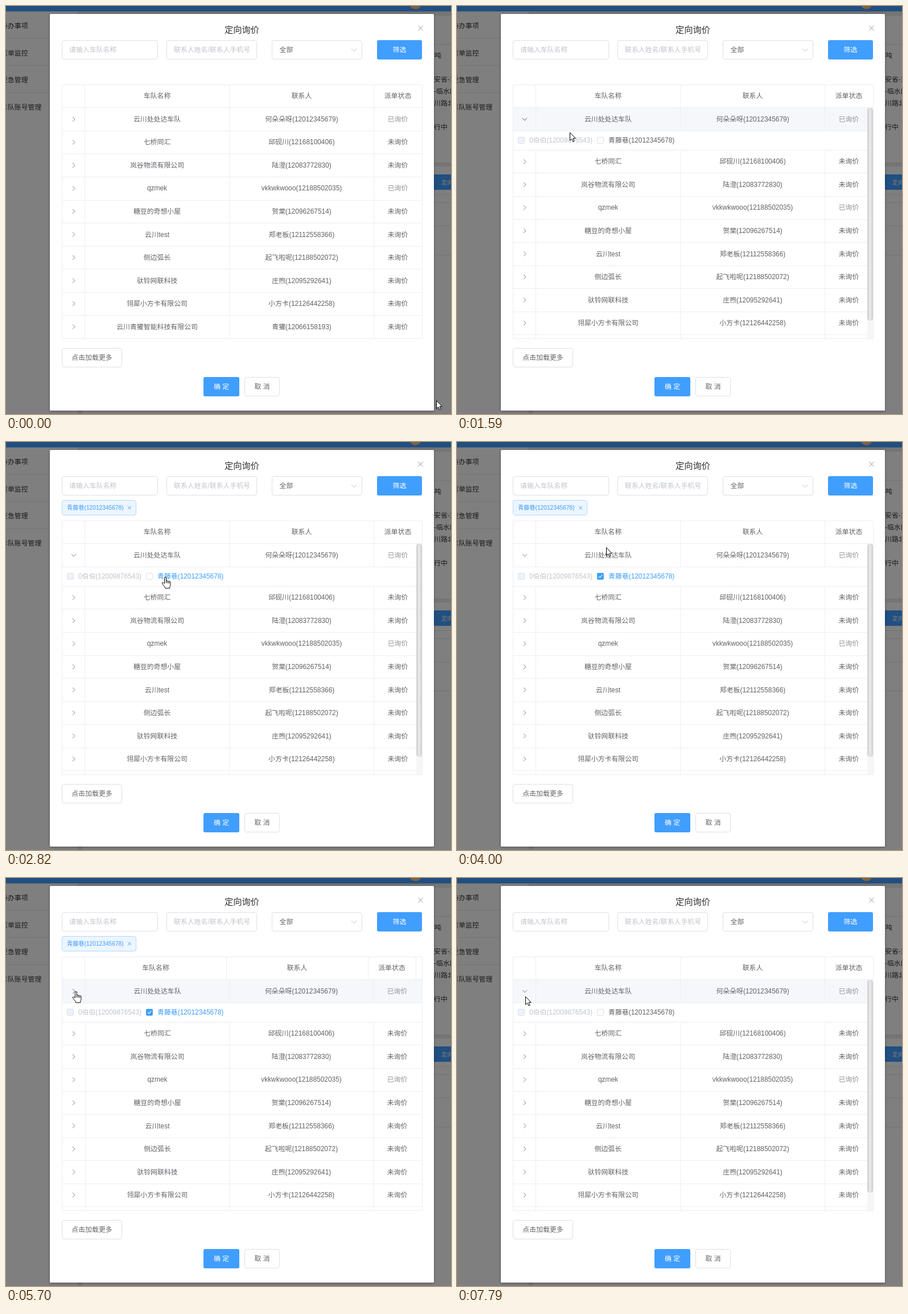
Animation, 782 px wide and 717 px high, one loop 8 s. Source, as an HTML page:

```html
<!DOCTYPE html>
<html lang="zh">
<head>
<meta charset="utf-8">
<title>定向询价</title>
<style>
html, body { margin: 0; width: 100%; height: 100%; overflow: hidden; background: #7f7f7f; }
svg { display: block; width: 782px; height: 717px; }
text {
  font: 11.9px "Liberation Sans", "Noto Sans CJK SC", "Noto Sans CJK", sans-serif;
  fill: #606266; white-space: pre;
}
</style>
</head>
<body>
<svg id="stage" viewBox="0 0 782 717"></svg>
<script>
const LOOP = 8000;
const BLUE = '#409eff', LINE = '#ebeef5', EDGE = '#dcdfe6', PALE = '#c0c4cc', GREY = '#606266', SOFT = '#909399';
const ROW = 40.53, TOP = 138.4;
const lineY = i => Math.floor(TOP + ROW * i);
const midY = i => TOP + ROW * (i + .5) - .6;

const FLEETS = [
  ['云川处处达车队', '何朵朵呀(12012345679)', 1],
  ['七桥同汇', '邱砚川(12168100406)'],
  ['岚谷物流有限公司', '陆澄(12083772830)'],
  ['qzmek', 'vkkwkwooo(12188502035)', 1],
  ['糖豆的奇想小屋', '贺棠(12096267514)'],
  ['云川test', '郑老板(12112558366)'],
  ['侧边弧长', '起飞啦呢(12188502072)'],
  ['驮铃网联科技', '庄煦(12095292641)'],
  ['翎犀小方卡有限公司', '小方卡(12126442258)'],
  ['云川青獾智能科技有限公司', '青獾(12066158193)']
];
const PICKED = '青藤巷(12012345678)';

// Column edges and text centres: settled, and while the scrollbar is being laid out.
const COLS = { edges: [138, 392, 646], mids: [265.5, 519.5, 688.5] };
const COLS_HEAD = { edges: [138, 387, 636, 720], mids: [263, 511.5, 678] };
const COLS_BODY = { edges: [139, 392, 645], mids: [266, 519, 687.5] };

// Pointer moves: first step, last step, number of steps, x, y, hand.
const MOVES = [
  [70, 210, 3, 655, 414, 0],
  [360, 1130, 11, 122, 192, 0],
  [1210, 1210, 1, 127, 195, 1],
  [1280, 1280, 1, 123, 195, 1],
  [1440, 1590, 3, 198, 222, 0],
  [1670, 2210, 8, 268, 245, 0],
  [2360, 2360, 1, 276, 240, 1],
  [2440, 2440, 1, 278, 237, 1],
  [2900, 3220, 5, 278, 232, 1],
  [3450, 3600, 3, 302, 216, 0],
  [3680, 3760, 2, 274, 232, 1],
  [3910, 4000, 2, 262, 185, 0],
  [4080, 4240, 3, 262, 221, 0],
  [4380, 4840, 7, 140, 203, 0],
  [4920, 4920, 1, 121, 199, 1],
  [5780, 6240, 7, 213, 120, 0],
  [6320, 6320, 1, 217, 117, 1],
  [6640, 6640, 1, 217, 117, 0],
  [6720, 7410, 10, 247, 223, 0],
  [7490, 7710, 4, 119, 192, 0],
  [7790, 7790, 1, 120, 208, 0]
];
const PRESSES = [[1280, 1440], [2670, 2820], [4920, 5070], [5530, 5700], [6490, 6640]];
const OPEN = [[1440, 5070], [5700, LOOP]];
const RELAYOUT = [[1440, 1515], [5700, 5790]];
const HOVER = [[1440, 1600], [5070, 5860], [7020, LOOP]];
const CHOSEN = [2820, 6640];

const rect = (x, y, w, h, fill, more = '') =>
  `<rect x="${x}" y="${y}" width="${w}" height="${h}" fill="${fill}" ${more}/>`;
const box = (x, y, w, h, fill, edge, r = 3.4) =>
  rect(x + .5, y + .5, w - 1, h - 1, fill, `stroke="${edge}" rx="${r}"`);
const text = (x, y, s, color = GREY, more = '') =>
  `<text x="${x}" y="${y}" dy=".36em" style="fill:${color};${more}">${s}</text>`;
const label = (x, y, s, color, more = '') => text(x, y, s, color, 'text-anchor:middle;' + more);
const stroke = (d, color, w = 1, more = '') =>
  `<path d="${d}" fill="none" stroke="${color}" stroke-width="${w}" ${more}/>`;
const cross = (x, y, r, color) =>
  stroke(`M${x - r} ${y - r}l${2 * r} ${2 * r}m0 ${-2 * r}l${-2 * r} ${2 * r}`, color);
const chevron = (x, y, id = '') =>
  `<g transform="translate(${x} ${y})">${stroke('M-2 -4L2 0L-2 4', '#808186', 1, id)}</g>`;

function page() {
  const dark = '#1b1b1c', gap = '#757575', rule = '#737375';
  const menu = ['待办事项', '货单监控', '应急管理', '车队账号管理'];
  const notes = [[753, 87, '吨'], [752, 129, '安省-东'], [752, 150, '-临水区'], [752, 171, '川路北'], [752, 213, '行中']];
  return rect(0, 0, 782, 717, '#7f7f7f') +
    rect(126, 9, 8, 708, gap) + rect(126, 9, 656, 8, gap) + rect(0, 0, 782, 9.5, '#204f80') +
    '<circle cx="719.5" cy="-5" r="10.5" fill="#80623f"/>' +
    menu.map((s, i) => text(-9, 35 + 47.5 * i, s, dark)).join('') +
    [56, 104, 152].map(y => rect(0, y, 126, 1, rule)).join('') +
    notes.map(n => text(...n, dark)).join('') +
    [67, 331, 345, 386, 437].map(y => rect(752, y, 30, 1, rule)).join('') +
    rect(752, 275, 30, 7, gap) +
    rect(740, 296, 42, 27, '#204f80') + text(765, 310, '定向', '#808080', 'font-size:10.2px');
}

function dialog() {
  const strong = 'font-weight:500';
  return rect(77, 14, 675, 697, '#fff', 'rx="1.5" style="filter:drop-shadow(0 1px 2px rgba(0,0,0,.35))"') +
    label(414.5, 41, '定向询价', '#303133', 'font-size:15.3px') + cross(728.5, 39, 4.3, SOFT) +
    box(98, 60, 169, 34, '#fff', EDGE) + text(111, 77, '请输入车队名称', PALE) +
    box(282, 60, 159, 34, '#fff', EDGE) +
    `<g clip-path="url(#field)">${text(295, 77, '联系人姓名/联系人手机号', PALE)}</g>` +
    box(467, 60, 159, 34, '#fff', EDGE) + text(480.5, 77, '全部') +
    stroke('M607 75l4.5 4.5l4.5 -4.5', PALE) +
    rect(652, 60, 79, 34, BLUE, 'rx="3"') + label(691.5, 77, '筛选', '#fff', strong) +
    box(98, 601, 106, 34, '#fff', EDGE) + label(151, 618, '点击加载更多') +
    rect(347, 652, 63, 34, BLUE, 'rx="3"') + label(378.5, 669, '确 定', '#fff', strong) +
    box(419, 652, 62, 34, '#fff', EDGE) + label(450, 669, '取 消');
}

const uprights = (cols, i) =>
  cols.edges.map(x => rect(x, lineY(i), 1, lineY(i + 1) - lineY(i), LINE)).join('');

function head(cols) {
  return uprights(cols, 0) + ['车队名称', '联系人', '派单状态'].map((s, k) => label(cols.mids[k], midY(0), s)).join('');
}

function row(cols, n) {
  const [name, contact, asked] = FLEETS[n], i = n + 1, y = midY(i);
  return uprights(cols, i) + rect(98, lineY(i + 1), 634, 1, LINE) +
    label(cols.mids[0], y, name) + label(cols.mids[1], y, contact) +
    label(cols.mids[2], y, asked ? '已询价' : '未询价', asked ? SOFT : GREY) +
    (n ? chevron(119, y + .3) : '');
}

const stage = document.getElementById('stage');
stage.innerHTML = `<defs>
  <clipPath id="field"><rect x="295" y="60" width="133" height="34"/></clipPath>
  <clipPath id="view"><rect x="98" y="178" width="634" height="406"/></clipPath>
  <linearGradient id="bar"><stop offset="0" stop-color="#cbcbcb"/><stop offset=".35" stop-color="#e6e6e6"/>
    <stop offset=".65" stop-color="#e6e6e6"/><stop offset="1" stop-color="#cbcbcb"/></linearGradient>
</defs>` + page() + dialog() +
  `<g id="tag">${box(98, 102, 131, 27, '#ecf5ff', '#b3d8ff')}
    ${text(107, 115.5, PICKED, BLUE, 'font-size:10.2px')}${cross(217, 115.5, 2.8, BLUE)}</g>
  <g id="head"></g>
  <g clip-path="url(#view)">
    ${rect(99, 179, 632, 40, '#f5f7fa', 'id="hover"')}
    <g id="first"></g>${chevron(119, 199, 'id="fold"')}
    <g id="rest"></g>
    <g id="panel">${rect(98, 253, 634, 1, LINE)}
      ${box(107, 230, 12, 12, '#edf2fc', EDGE, 1.7)}${text(127, 236, '0伯伯(12009876543)', PALE)}
      ${box(246, 230, 12, 12, '#fff', EDGE, 1.7)}
      <g id="fill">${box(246, 230, 12, 12, BLUE, BLUE, 1.7)}</g>
      ${stroke('M249 236l2.2 2.3l4 -4.6', '#fff', 1.1, 'id="tick"')}
      <g id="choice">${text(266, 236, PICKED)}</g></g>
    <g id="scroll">${rect(721, 179, 10, 405, '#f6f6f6')}
      ${rect(721.5, 179.5, 9, 373, 'url(#bar)', 'rx="4" stroke="#cfcfcf" stroke-width=".8"')}</g>
  </g>` +
  [138, 178, 584].map(y => rect(98, y, 634, 1, LINE)).join('') +
  [98, 731].map(x => rect(x, 138, 1, 447, LINE)).join('') +
  `<g id="pointer">
    <g id="ring" fill="none"><circle cx=".5" cy=".5" r="9.8" stroke="#000"/><circle cx=".5" cy=".5" r="8.8" stroke="#fff"/></g>
    <g fill="#fff" stroke="#000" stroke-linejoin="round">
      <path id="arrow" d="M.5 .5V14.5L3.7 11.6L6 16.5L8.2 15.5L6 10.7H10.3Z"/>
      <path id="hand" d="M.5 11.5V2a1.5 1.5 0 0 1 3 0V7.5a1.4 1.4 0 0 1 2.6 0V8.3a1.3 1.3 0 0 1 2.5 0V9.2a1.2 1.2 0 0 1 2.4 0V14c0 2 -1.4 3.2 -1.4 6H1.8c0 -2.5 -3 -4.8 -5.3 -8.1c-.8 -1.6 .8 -2.6 2 -1.6ZM3.5 7.5V11M6.1 8.3V11.3M8.6 9.2V11.6"/>
    </g></g>`;

const el = {};
stage.querySelectorAll('[id]').forEach(e => el[e.id] = e);

const clamp = v => Math.max(0, Math.min(1, v));
const ease = v => { v = clamp(v); return v * v * (3 - 2 * v); };
const within = (spans, t) => spans.some(([a, b]) => t >= a && t < b);
const fade = (spans, t, ms) => spans.reduce((v, [a, b]) =>
  Math.max(v, t >= a && t < b ? 1 : t >= b ? 1 - ease((t - b) / ms) : 0), 0);
const show = (e, on) => e.style.display = on ? '' : 'none';

function pointerAt(t) {
  let x = 756, y = 693, hand = 0;
  for (const [from, to, n, tx, ty, h] of MOVES) {
    if (t < from) break;
    const gap = n > 1 ? (to - from) / (n - 1) : 1;
    const k = Math.min(n, Math.floor((t - from) / gap + .1) + 1);
    x += (tx - x) * k / n;
    y += (ty - y) * k / n;
    hand = h;
  }
  return { x: Math.round(x), y: Math.round(y), hand };
}

function foldAngle(t) {
  if (t < 5070) return 90 * ease((t - 1440) / 180);
  if (t < 5700) return 90 - 90 * ease((t - 5070) / 180);
  return 90 * ease((t - 5700) / 180);
}

let laidOut = null;
function layout(moving) {
  if (laidOut === moving) return;
  laidOut = moving;
  const body = moving ? COLS_BODY : COLS;
  el.head.innerHTML = head(moving ? COLS_HEAD : COLS);
  el.first.innerHTML = row(body, 0);
  el.rest.innerHTML = FLEETS.map((f, n) => n ? row(body, n) : '').join('');
}

function draw(t) {
  const open = within(OPEN, t), moving = within(RELAYOUT, t), chosen = within([CHOSEN], t);
  layout(moving);
  show(el.panel, open);
  show(el.scroll, open && !moving);
  show(el.tag, chosen);
  el.rest.setAttribute('transform', `translate(0 ${open ? 34 : 0})`);
  el.fold.setAttribute('transform', `rotate(${foldAngle(t)})`);
  el.hover.style.opacity = fade(HOVER, t, 230);
  const [on, off] = CHOSEN;
  el.fill.style.opacity = ease((t - on) / 250) - ease((t - off) / 250);
  el.tick.style.opacity = ease((t - on - 50) / 150) - ease((t - off) / 150);
  el.choice.firstChild.style.fill = chosen ? BLUE : GREY;

  const p = pointerAt(t);
  el.pointer.setAttribute('transform', `translate(${p.x} ${p.y})`);
  show(el.arrow, !p.hand);
  show(el.hand, p.hand);
  show(el.ring, within(PRESSES, t));
}

const start = performance.now();
function tick() {
  draw((performance.now() - start) % LOOP);
  requestAnimationFrame(tick);
}
tick();
</script>
</body>
</html>
```
